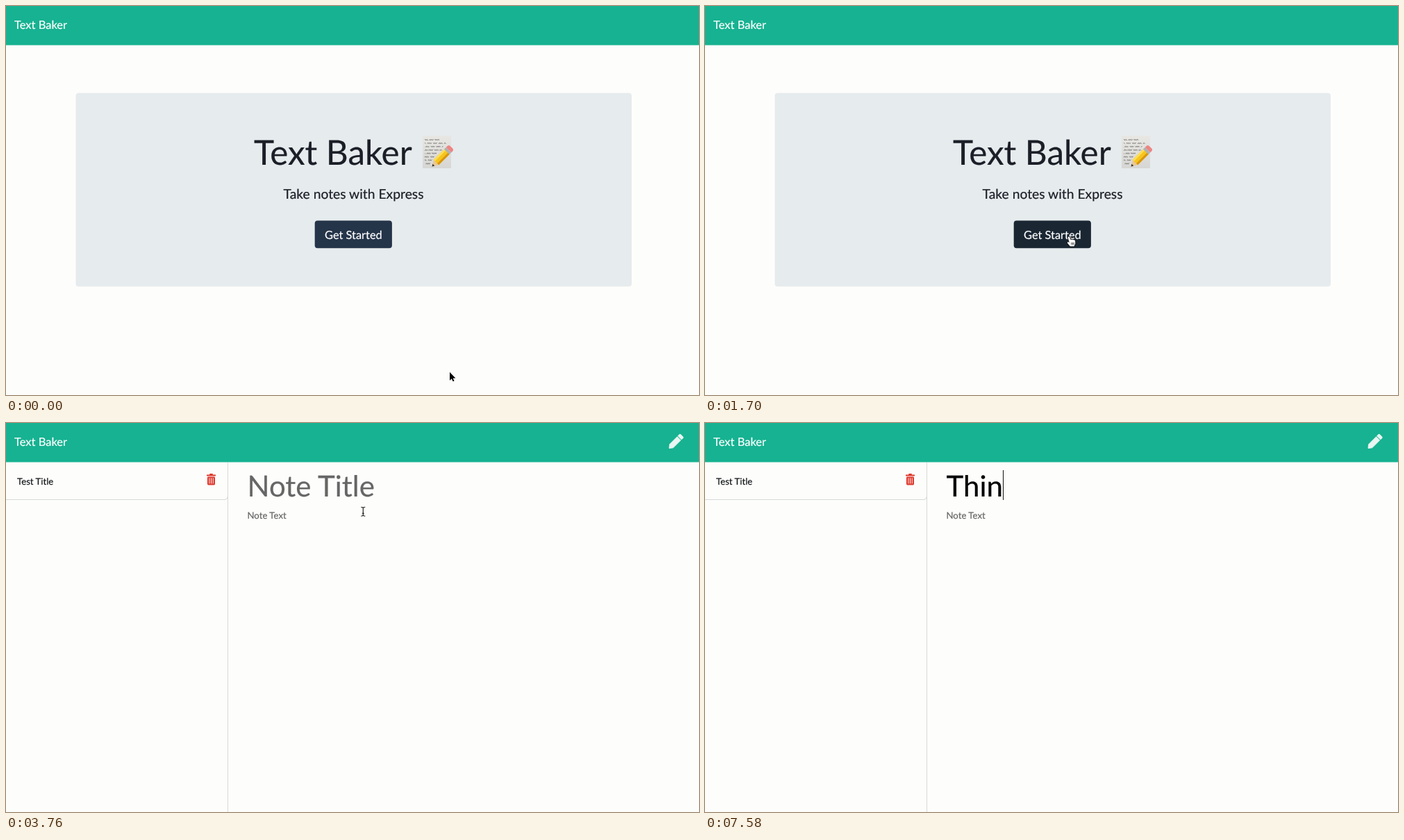
These frames come from a looping animation (998x561 px, 8000 ms). An HTML page with a canvas:

```html
<!DOCTYPE html>
<html lang="en">
<head>
<meta charset="utf-8">
<title>Notes app</title>
<style>
html, body { margin: 0; width: 100%; height: 100%; overflow: hidden; background: #fdfdfb; }
canvas { display: block; }
</style>
</head>
<body>
<canvas id="stage" width="998" height="561"></canvas>
<script>
const ctx = document.getElementById('stage').getContext('2d');
const LOOP = 8000, OPEN = 2780;
const NAME = 'Text Baker';

// Pointer stops: time, x, y
const path = [
  [20, 639, 528], [820, 562, 386], [1240, 514, 348], [1560, 526, 335],
  [1660, 526, 334], [2800, 526, 334], [3240, 514, 150], [3360, 513.5, 139],
  [3500, 513.5, 139], [4200, 516, 103], [4320, 516, 105], [4500, 517, 108],
  [4640, 517, 108], [4760, 518, 82]
];
// Typed text: time, value
const typed = [[6180, 'T'], [6720, 'Th'], [7280, 'Thi'], [7540, 'Thin']];

const clamp = v => Math.max(0, Math.min(1, v));
const ease = v => v * v * (3 - 2 * v);

function pointer(t) {
  let a = path[0];
  for (const b of path) {
    if (t < b[0]) {
      const k = ease(clamp((t - a[0]) / (b[0] - a[0] || 1)));
      return [a[1] + (b[1] - a[1]) * k, a[2] + (b[2] - a[2]) * k];
    }
    a = b;
  }
  return [a[1], a[2]];
}

function mix(a, b, k) {
  return `rgb(${a.map((v, i) => Math.round(v + (b[i] - v) * k))})`;
}

function rect(x, y, w, h, color, r = 0) {
  ctx.fillStyle = color;
  ctx.beginPath();
  ctx.roundRect(x, y, w, h, r);
  ctx.fill();
}

// A hairline stroke gives the slightly heavier smoothed look
function text(s, x, y, size, color) {
  ctx.font = `${size}px Lato, sans-serif`;
  ctx.textRendering = 'geometricPrecision';
  ctx.fillStyle = ctx.strokeStyle = color;
  ctx.lineWidth = .2;
  ctx.fillText(s, x, y);
  ctx.strokeText(s, x, y);
}

function shape(d, fill, stroke, width = 1) {
  const p = new Path2D(d);
  if (stroke) {
    ctx.strokeStyle = stroke;
    ctx.lineWidth = width;
    ctx.stroke(p);
  }
  if (fill) {
    ctx.fillStyle = fill;
    ctx.fill(p);
  }
}

function at(x, y, draw) {
  ctx.save();
  ctx.translate(x, y);
  draw();
  ctx.restore();
}

function arrow() {
  shape('M0 0V12L2.8 9.5L4.7 13.6L6.5 12.8L4.7 8.8H8.4Z', '#000', '#fff', 1.6);
}

function hand() {
  shape('M-3.2 -.8C-2.6 -1.8 -1.2 -1.5 -.8 -.4L.6 3.2C1.2 2.4 2.4 2.6 2.7 3.3' +
    'C3.4 2.6 4.5 2.8 4.9 3.6C5.8 3.1 7 3.6 7.1 4.8L7.3 8.4L5.6 12.6H-.2' +
    'L-4 8.1C-4.8 6.8 -3.4 5.8 -2.3 6.6L-1.2 7.3L-3.2 1Z', '#fff', '#111', 1.8);
  shape('M1.7 7V10.5M3.5 7V10.5M5.2 7V10.5', null, '#222', .8);
}

function beam() {
  const d = 'M-3 -6.5Q-.2 -6.5 0 -5Q.2 -6.5 3 -6.5M0 -5V5M-3 6.5Q-.2 6.5 0 5Q.2 6.5 3 6.5M-1.5 2.5H1.5';
  shape(d, null, 'rgba(255,255,255,.7)', 2.4);
  shape(d, null, '#111', 1.1);
}

function memo() {
  const g = ctx.createLinearGradient(0, 187, 0, 234);
  g.addColorStop(0, '#e8e7e3');
  g.addColorStop(1, '#d6d6d4');
  rect(600, 187, 41, 47, g, 1);
  ctx.strokeStyle = '#6b6965';
  ctx.lineWidth = .8;
  ctx.beginPath();
  for (let row = 0; row < 8; row++) {
    const y = 193 + row * 4.9, end = [625, 634, 630, 628, 620, 617, 615, 611][row];
    for (let x = 603; x < end; x += .8) {
      const gap = (Math.floor(x) + row * 3) % 8 < 2;
      ctx[gap || x === 603 ? 'moveTo' : 'lineTo'](x, y + Math.sin(x * 2.6 + row) * .9);
    }
  }
  ctx.stroke();
  at(613.5, 231.5, () => {
    ctx.rotate(-Math.PI / 4);
    shape('M0 0L9 -5.3V5.3Z', '#e9c793');
    shape('M0 0L3.4 -2V2Z', '#333');
    rect(8.5, -5.3, 22, 10.6, '#f6c51d');
    rect(8.5, -5.3, 22, 3, '#ffde56');
    rect(8.5, 2.3, 22, 3, '#d99610');
    rect(30, -5.3, 4, 10.6, '#aeb2b2');
    rect(34, -5.3, 5.5, 10.6, '#ee8583', [0, 3, 3, 0]);
  });
}

function home(t) {
  rect(100.5, 125.5, 800.5, 279, '#e6ebed', 4);
  text(NAME, 357, 228.5, 49.4, '#1b1e27');
  memo();
  text('Take notes with Express', 399.5, 278, 19.3, '#1b1e27');
  const press = clamp((t - 2500) / 140);
  if (press) {
    rect(442.8, 307.8, 115.4, 43.4, `rgba(92,110,124,${.65 * press})`, 6);
  }
  const hover = clamp((t - 1360) / 300);
  const fill = press
    ? mix([26, 39, 51], [20, 29, 40], press)
    : mix([36, 52, 73], [26, 39, 51], hover);
  rect(444.7, 309.6, 111.2, 39.7, fill, 4);
  text('Get Started', 459, 335.5, 16.4, '#fff');
}

function trash() {
  const red = '#dd3a2e';
  rect(289, 74.5, 13, 2, red, .6);
  rect(293, 73, 5, 2, red, 1);
  rect(290, 77.5, 11, 12, red, 1.4);
  for (const x of [292.3, 295, 297.7]) rect(x, 79.3, 1, 8.2, '#fbe9e6');
}

function pencil() {
  at(955, 36.5, () => {
    ctx.rotate(-Math.PI / 4);
    shape('M0 0L4.5 -3.6H20V3.6H4.5Z', '#e9f6f2', '#e9f6f2', .8);
    rect(21.2, -4, 5, 8, '#e9f6f2', [0, 1.6, 1.6, 0]);
  });
}

function notes(t) {
  pencil();
  rect(319, 57, 1, 504, '#d9dad8');
  shape('M0 110.5H315Q319 110.5 319 106.5', null, '#d6d9da', 1);
  text('Test Title', 16, 88.5, 13.2, '#16191c');
  trash();

  let value = '';
  for (const [start, s] of typed) if (t >= start) value = s;
  text(value || 'Note Title', 347.5, 105.5, 42, value ? '#000' : '#666');
  const caretX = 347.5 + ctx.measureText(value).width;
  text('Note Text', 347.5, 138.3, 13.2, '#666');
  if (value || (t >= 4320 && t < 5580)) {
    rect(Math.round(caretX), 68, 1, 43, '#111');
  }
}

function draw(t) {
  rect(0, 0, 998, 561, '#fdfdfb');
  rect(0, 0, 998, 56.6, '#16b291');
  text(NAME, 12, 32.5, 16.5, '#fff');
  if (t < OPEN) home(t);
  else notes(t);
  if (t >= 6180) return;
  const [x, y] = pointer(t);
  at(x, y, t < 1360 ? arrow : t < 2840 ? hand : beam);
}

function tick(now) {
  draw(now % LOOP);
  requestAnimationFrame(tick);
}
draw(0);
requestAnimationFrame(tick);
</script>
</body>
</html>
```
